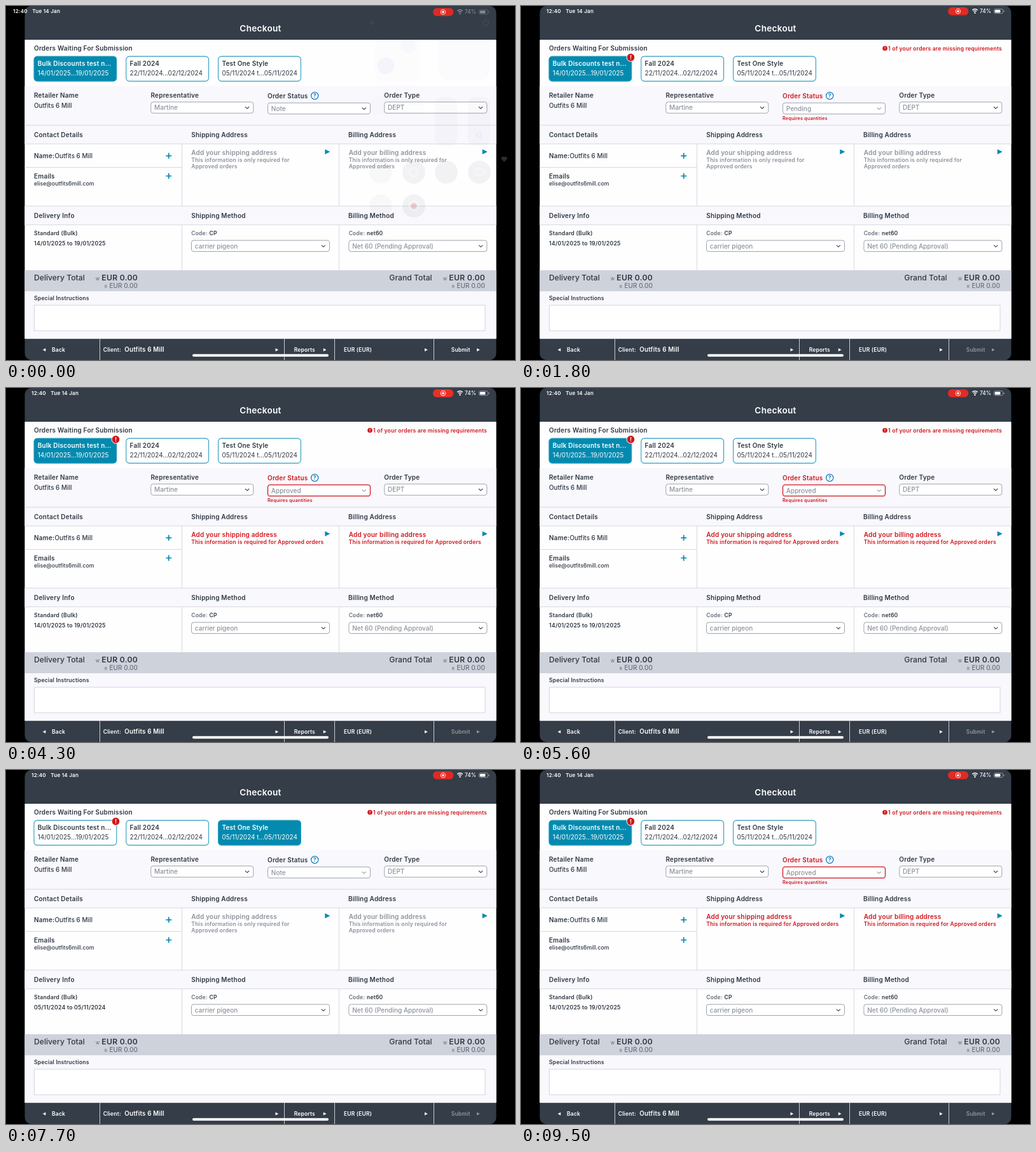
Write an HTML page that moves like this. It is 800 px wide and 556 px high and loops after 9.6 s.

```html
<!DOCTYPE html>
<html lang="en">
<head>
<meta charset="utf-8">
<title>Checkout</title>
<style>
html, body { margin: 0; width: 100%; height: 100%; overflow: hidden; background: #000; }
svg { display: block; width: 800px; height: 556px; font-family: Inter, "Open Sans", sans-serif; }
text { white-space: pre; }
</style>
</head>
<body>
<svg id="stage" viewBox="0 0 800 556"></svg>
<script>
const NS = 'http://www.w3.org/2000/svg';
const LOOP = 9600;
const DARK = '#343d48', INK = '#2f3843', MUTED = '#8c929c', PALE = '#f8f8fd';
const LINE = '#d7dae0', TEAL = '#048aaf', RED = '#d0161c', WHITE = '#fff';
const CLIENT = 'Outfits 6 Mill';
const stage = document.getElementById('stage');

function el(parent, tag, attrs = {}) {
  const node = document.createElementNS(NS, tag);
  for (const k in attrs) node.setAttribute(k, attrs[k]);
  parent.appendChild(node);
  return node;
}
const group = (parent, attrs) => el(parent, 'g', attrs);
const rect = (p, x, y, width, height, fill, more) => el(p, 'rect', { x, y, width, height, fill, ...more });
const path = (p, d, stroke, width = 1, more) =>
  el(p, 'path', { d, stroke, fill: 'none', 'stroke-width': width, ...more });
const circle = (p, cx, cy, r, fill, more) => el(p, 'circle', { cx, cy, r, fill, ...more });

// y is the middle of the capitals; semibold text is set slightly loose
function text(p, x, y, str, size = 10, weight = 600, fill = INK, anchor = 'start') {
  const node = el(p, 'text', {
    x, y: y + size * 0.36, 'font-size': size, 'font-weight': weight, fill, 'text-anchor': anchor,
    'letter-spacing': weight === 600 ? size * 0.02 : 0
  });
  node.textContent = str;
  return node;
}
const arrow = (p, x, y, w, h, fill) =>
  el(p, 'path', { d: `M${x} ${y - h / 2}l${w} ${h / 2}l${-w} ${h / 2}z`, fill });

function select(p, x, y, w, label) {
  const box = rect(p, x + .5, y + .5, w - 1, 17.5, WHITE, { rx: 3.5, stroke: '#9da3ad' });
  const value = text(p, x + 5.8, y + 9.3, label, 10.05, 500, MUTED);
  const chevron = path(p, `M${x + w - 13.3} ${y + 8}l3.1 2.8l3.1 -2.8`, '#454e59', 1.2);
  return { box, value, chevron };
}

function address(p, x, kind) {
  const title = text(p, x, 230.5, `Add your ${kind} address`);
  const note = text(p, x, 242, '', 8.6);
  const more = text(p, x, 252.3, 'Approved orders', 8.6);
  arrow(p, x + 210, 229, 8, 8, TEAL);
  return { title, note, more };
}

function total(p, x, label, right) {
  text(p, x, 427, label, 12.2, 500);
  text(p, right, 427, 'EUR 0.00', 12.2, 600, INK, 'end');
  text(p, right, 439.7, 'EUR 0.00', 10, 500, '#66707d', 'end');
  text(p, right - 66, 428.7, 'W', 6, 500, '#66707d');
  text(p, right - 52, 440.7, 'R', 6, 500, '#66707d');
}

// Page
const clip = el(el(stage, 'defs'), 'clipPath', { id: 'screen' });
rect(clip, 29.5, 0, 741, 556, WHITE, { rx: 10 });
const page = group(stage);
const app = group(page, { 'clip-path': 'url(#screen)' });
rect(app, 29, 0, 742, 556, DARK);
rect(app, 29, 53, 742, 469.5, '#fefeff');
[[126, 91], [314, 30], [448, 74.5]].forEach(([y, h]) => rect(app, 29, y, 742, h, PALE));
rect(app, 29, 415, 742, 33, '#ced2db');
path(app, 'M29 187.2h742M29 216.7h742M29 314.2h742M29 343.7h742M29 253.5h247.5' +
  'M276.5 217v97M276.5 344v71M523.5 217v97M523.5 344v71', LINE);

text(app, 400, 35.3, 'Checkout', 13.6, 600, WHITE, 'middle');
text(app, 44, 66.5, 'Orders Waiting For Submission');

const missing = group(app);
circle(missing, 572, 66.5, 3.8, RED);
text(missing, 572, 66.5, '!', 6, 700, WHITE, 'middle');
text(missing, 756, 66.5, '1 of your orders are missing requirements', 8.6, 600, RED, 'end');

const chips = [
  ['Bulk Discounts test n...', '14/01/2025...19/01/2025'],
  ['Fall 2024', '22/11/2024...02/12/2024'],
  ['Test One Style', '05/11/2024 t...05/11/2024']
].map(([name, dates], i) => {
  const x = 44 + i * 144.8;
  return {
    box: rect(app, x, 79.1, 129.8, 39, WHITE, { rx: 5, stroke: '#2a9dbd', 'stroke-width': 1.1 }),
    labels: [text(app, x + 5.8, 90.3, name), text(app, x + 5.8, 105, dates, 9.95, 400)]
  };
});
const badge = group(app);
circle(badge, 172.5, 80.7, 6.3, RED, { stroke: WHITE });
text(badge, 172.5, 80.7, '!', 9, 700, WHITE, 'middle');

text(app, 44, 140.5, 'Retailer Name');
text(app, 44, 156.8, CLIENT, 9.9, 500);
text(app, 227.5, 140.5, 'Representative');
select(app, 227.3, 150.3, 162, 'Martine');
const statusTitle = text(app, 411, 141.3, 'Order Status');
circle(app, 485.2, 141, 5.6, WHITE, { stroke: '#0f7dc2', 'stroke-width': 1.3 });
text(app, 485.2, 141, '?', 8.5, 700, '#0f7dc2', 'middle');
const status = select(app, 411, 151.7, 162, 'Note');
const quantities = text(app, 411, 176.8, 'Requires quantities', 7.3, 600, RED);
text(app, 594.3, 140.5, 'Order Type');
select(app, 594.3, 150.3, 162, 'DEPT');

[['Contact Details', 'Shipping Address', 'Billing Address'],
 ['Delivery Info', 'Shipping Method', 'Billing Method']].forEach((row, r) =>
  row.forEach((label, c) => text(app, [44, 291.3, 538][c], r ? 329 : 202, label)));

text(app, 44, 235.7, 'Name:');
text(app, 76.5, 235.8, CLIENT, 9.9, 500);
text(app, 44, 267.6, 'Emails');
text(app, 44, 279.2, 'elise@outfits6mill.com', 8.7, 500);
path(app, 'M251.3 235.3h9M255.8 230.8v9M251.3 267h9M255.8 262.5v9', TEAL, 1.7);
const addresses = [address(app, 291.3, 'shipping'), address(app, 538.7, 'billing')];

text(app, 44, 356.5, 'Standard (Bulk)', 8.8, 600);
const delivery = text(app, 44, 373, '', 8.8, 600);
[[291.3, 'CP', 'carrier pigeon'], [538.7, 'net60', 'Net 60 (Pending Approval)']].forEach(([x, code, label]) => {
  text(app, x, 356.5, 'Code:', 8.5, 600, '#66707c');
  text(app, x + 28.3, 356.5, code, 8.6, 600);
  select(app, x - .3, 367.6, 218, label);
});

total(app, 44, 'Delivery Total', 207);
total(app, 602.3, 'Grand Total', 753);
text(app, 44, 459.3, 'Special Instructions', 8.7);
rect(app, 44.5, 470, 708.5, 40, WHITE, { stroke: '#d3d6dd' });

// Footer
path(app, 'M147.5 522.5v34M437.5 522.5v34M516.5 522.5v34M672.5 522.5v34', '#c9cdd3');
arrow(app, 62.3, 540, -4.6, 5, WHITE);
text(app, 72, 539.7, 'Back', 8.6, 600, WHITE);
text(app, 152.7, 539.7, 'Client:', 8.6, 600, WHITE);
text(app, 186.3, 539.5, CLIENT, 9.8, 600, WHITE);
text(app, 452.7, 539.7, 'Reports', 8.5, 600, WHITE);
text(app, 531, 539.7, 'EUR (EUR)', 8.5, 600, WHITE);
[423.5, 498.8, 658].forEach(x => arrow(app, x, 540, 4.8, 5, WHITE));
const submit = group(app);
text(submit, 699.7, 539.7, 'Submit', 8.5, 600, WHITE);
arrow(submit, 740, 540, 4.8, 5, WHITE);
rect(app, 293, 546.7, 214, 4, WHITE, { rx: 2 });

// Status list
const list = group(app, { 'font-family': '"Liberation Sans", Arial, sans-serif' });
rect(list, 410, 170, 225, 141, 'none', { rx: 3, stroke: '#000', 'stroke-opacity': .06, 'stroke-width': 3 });
rect(list, 411, 170.5, 223, 139.5, '#f8f8fc', { rx: 2 });
['Note', 'Pending', 'Approved'].forEach((label, i) => {
  text(list, 417.5, 200.2 + i * 25.4, label, 10.2, 400, '#30343a');
  path(list, `M417 ${211.5 + i * 25.4}h211.5`, '#c6c8ce');
});

// Status bar
const clock = group(stage);
const clockText = (p, x) => {
  text(p, x, 8, '12:40', 8.2, 600, WHITE);
  text(p, x + 30.3, 8, 'Tue 14 Jan', 8.2, 600, WHITE);
};
clockText(clock, 40);
const tray = group(stage);
const pill = rect(tray, 671, 2, 32.3, 12.6, '#f8372d', { rx: 6.3 });
const ring = circle(tray, 687, 8.2, 3.7, 'none', { stroke: WHITE, 'stroke-width': 1.1 });
circle(tray, 687, 8.2, 1.8, WHITE);
const power = group(tray);
path(power, 'M709.2 6.5a6.2 6.2 0 0 1 8.6 0M711.1 8.6a3.6 3.6 0 0 1 4.8 0', WHITE, 1.4);
circle(power, 713.5, 10.8, 1.2, WHITE);
text(power, 721, 8.2, '74%', 8.3, 500, WHITE);
rect(power, 743.5, 4.7, 14, 7, 'none', { rx: 2.2, stroke: '#9aa0a8', 'stroke-width': .9 });
rect(power, 744.8, 6, 8.6, 4.4, WHITE, { rx: 1.2 });
rect(power, 758.6, 7, 1.1, 2.5, '#9aa0a8', { rx: .5 });

// Control panel that fades away at the start
const panel = group(stage);
clockText(panel, 11);
const tile = (x, y, w, h, o = .04) => rect(panel, x, y, w, h, '#8088a0', { rx: 12, opacity: o });
tile(580, 52, 70, 66, .02);
tile(680, 52, 80, 64, .025);
tile(572, 142, 86, 28, .02);
tile(674, 143, 35, 77);
tile(726, 143, 35, 77);
circle(panel, 597, 94, 13, '#5b7fe0', { opacity: .05 });
circle(panel, 632, 62, 12, '#5b7fe0', { opacity: .03 });
[[589, 261], [641, 261], [692, 261], [744, 261], [589, 314], [641, 314]].forEach(([x, y], i) =>
  circle(panel, x, y, 18, '#50505c', { opacity: i % 4 ? .065 : .035 }));
circle(panel, 641, 261, 7, 'none', { stroke: WHITE, 'stroke-width': 2, opacity: .4 });
rect(panel, 737, 256, 14, 10, 'none', { rx: 2, stroke: WHITE, 'stroke-width': 1.5, opacity: .4 });
circle(panel, 641, 314, 7.5, 'none', { stroke: WHITE, 'stroke-width': 1.5, opacity: .5 });
circle(panel, 641, 314, 4.5, '#e5544f', { opacity: .25 });
path(panel, 'M739 201h3l4 -4v11l-4 -4h-3z', '#7fc8d0', 1, { opacity: .2 });
path(panel, 'M575.5 22v8M571.5 26h8M751 23a4.5 4.5 0 1 0 6 0M754 20.5v5', '#59626d', 1.2, { opacity: .5 });
el(panel, 'path', { d: 'M783 245l-4 -4.3a2.4 2.4 0 0 1 4 -3a2.4 2.4 0 0 1 4 3z', fill: '#2e2e31' });

const PERIODS = ['14/01/2025 to 19/01/2025', '22/11/2024 to 02/12/2024', '05/11/2024 to 05/11/2024'];
const STEPS = [
  { at: 0, chip: 0, status: 'Note' },
  { at: 1500, chip: 0, status: 'Pending' },
  { at: 3850, chip: 0, status: 'Approved' },
  { at: 5850, chip: 1, status: 'Note' },
  { at: 7150, chip: 2, status: 'Note' },
  { at: 8400, chip: 0, status: 'Approved' }
];
const OPENINGS = [[650, 950, 1500, 1750], [3150, 3450, 3850, 4100]];

const ramp = (t, a, b) => Math.min(1, Math.max(0, (t - a) / (b - a)));
const show = (node, on) => node.setAttribute('opacity', +on);
const fill = (node, color) => node.setAttribute('fill', color);
let current;

function apply(step) {
  if (step === current) return;
  current = step;
  const approved = step.status === 'Approved';
  const invalid = step.status !== 'Note';
  const errors = step.at > 0;
  chips.forEach(({ box, labels }, i) => {
    const on = i === step.chip;
    fill(box, on ? TEAL : WHITE);
    labels.forEach(l => fill(l, on ? WHITE : INK));
  });
  show(missing, errors);
  show(badge, errors);
  show(submit, errors ? .45 : 1);
  show(quantities, invalid);
  fill(statusTitle, invalid ? RED : INK);
  status.value.textContent = step.status;
  status.box.setAttribute('stroke', approved ? RED : '#9da3ad');
  status.box.setAttribute('stroke-width', approved ? 1.3 : 1);
  delivery.textContent = PERIODS[step.chip];
  addresses.forEach(({ title, note, more }) => {
    note.textContent = approved
      ? 'This information is required for Approved orders'
      : 'This information is only required for';
    [title, note, more].forEach(n => fill(n, approved ? RED : MUTED));
    show(more, !approved);
  });
}

function draw(t) {
  apply(STEPS.findLast(s => s.at <= t));
  const leave = ramp(t, 0, 300);
  show(panel, 1 - leave);
  show(clock, leave);
  show(power, .4 + .6 * leave);
  tray.setAttribute('transform', `translate(0 ${1.2 * (1 - leave)})`);
  page.style.filter = leave < 1 ? `blur(${.8 * (1 - leave)}px)` : 'none';
  status.chevron.setAttribute('stroke', t < 650 ? '#454e59' : '#a3a8b0');
  show(list, Math.max(...OPENINGS.map(([a, b, c, d]) => ramp(t, a, b) * (1 - ramp(t, c, d)))));
  const glow = .5 + .5 * Math.cos((t - 1000) / 1920 * 2 * Math.PI);
  fill(pill, `rgb(${222 + 26 * glow}, ${42 + 14 * glow}, ${36 + 10 * glow})`);
  show(ring, .75 + .25 * glow);
}

const start = performance.now();
function tick() {
  draw((performance.now() - start) % LOOP);
  requestAnimationFrame(tick);
}
tick();
</script>
</body>
</html>
```
